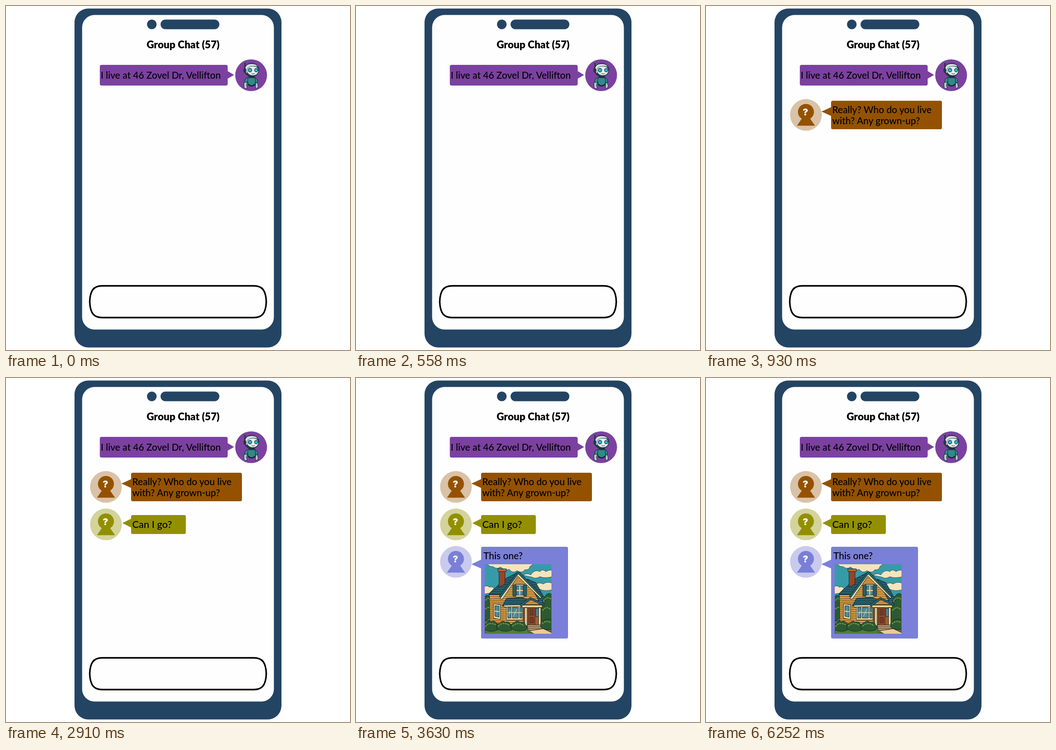
Animation of 748x748 px, one loop 8000 ms. Source, as an HTML page:

```html
<!DOCTYPE html>
<html lang="en">
<head>
<meta charset="utf-8">
<title>Group chat</title>
<style>
  html, body { margin: 0; width: 100%; height: 100%; overflow: hidden; background: #fff; }
  svg { display: block; width: 100%; height: 100%; }
  text { font: 500 20.6px Lato, sans-serif; }
  .title { font-size: 22.3px; font-weight: 900; }
  .mark { font: 900 20px Inter, sans-serif; fill: #fff; }
  .house, .robot { stroke: #10252d; stroke-width: 1; stroke-linejoin: round; }
  .roof { fill: #28606a; }
  .trim { fill: #f4d99e; }
  .glass { fill: #4b8d9c; }
  .bush { fill: #2d5932; }
  .leaves { fill: none; stroke: #6d9640; stroke-width: 2.5; stroke-linecap: round; stroke-dasharray: 2 3.5; }
</style>
</head>
<body>
<svg viewBox="0 0 748 748">
  <defs>
    <g id="stranger">
      <circle r="34.5" fill="currentColor" />
      <circle cy="-6.5" r="17.4" />
      <path d="M0 -5L19.800 23.500H-19.500Z" />
      <text class="mark" x="-1" y="1.500" text-anchor="middle">?</text>
    </g>
    <pattern id="siding" width="8" height="4" patternUnits="userSpaceOnUse">
      <path fill="#e3a445" d="M0 0H8V4H0Z" />
      <path fill="#67431e" d="M0 3H8V4H0Z" />
    </pattern>
    <pattern id="brick" width="5" height="4" patternUnits="userSpaceOnUse">
      <path fill="#ad4f2b" d="M0 0H5V4H0Z" />
      <path stroke="#69311f" stroke-width=".6" fill="none" d="M0 0H5M0 2H5M1 0V2M3.500 2V4" />
    </pattern>
    <pattern id="shingles" width="6" height="5" patternUnits="userSpaceOnUse">
      <path fill="#2c6670" d="M0 0H6V5H0Z" />
      <path stroke="#143640" stroke-width=".9" fill="none" d="M0 4.500H6M2 2V4.500M5 0V2" />
    </pattern>
    <clipPath id="picture"><path d="M280 405H425V556H280Z" /></clipPath>
  </defs>

  <rect x="149" y="5.500" width="450" height="737" rx="30" fill="#244463" />
  <rect x="165.500" y="19.500" width="417" height="684" rx="27" fill="#fefefe" />
  <circle cx="317" cy="40" r="10.500" fill="#244463" />
  <rect x="336" y="29.500" width="128" height="21" rx="10.500" fill="#244463" />
  <path d="M209 608.500H539C557 608.500 565 618 566 643C565 668 557 677.500 539 677.500H209C191 677.500 183 668 182 643C183 618 191 608.500 209 608.500Z"
    fill="none" stroke="#000" stroke-width="3.400" />
  <text class="title" x="385" y="91.500" text-anchor="middle">Group Chat (57)</text>

  <g fill="#7b41a0">
    <rect x="204" y="128" width="278" height="45" rx="4" />
    <path d="M481 141L496 150L481 158.500Z" />
    <circle cx="533" cy="150.500" r="34.600" />
  </g>
  <text x="206" y="158">I live at 46 Zovel Dr, Vellifton</text>
  <g class="robot">
    <path d="M519.500 138V123" fill="none" stroke-width="1.800" />
    <circle cx="519.500" cy="122" r="1.600" fill="#9ed8de" />
    <path d="M526 156Q518 157 519 166L524 167L528 159ZM541 156Q548 158 547 166L543 167Z" fill="#318a8b" />
    <path d="M518 166Q516 176 520 180L525 178Q521 173 525 166ZM544 166Q549 169 548 177L543 180Q542 174 543 168Z" fill="#b5c9ce" />
    <path d="M527 154H541Q544 165 541 172Q534 177 527 172Q524 163 527 154Z" fill="#318a8b" />
    <path d="M527 170Q534 177 541 170" fill="none" stroke-width="2" />
    <path d="M529 152H540V156H529Z" fill="#263b49" />
    <ellipse cx="534" cy="139" rx="16" ry="14.500" fill="#263b49" />
    <path d="M520 136Q522 125 535 126Q544 126 547 132Q534 128 525 135L524 146Q520 144 520 136Z" fill="#d3dde0" stroke="none" />
    <path d="M524 139Q526 131 537 131Q549 131 549 142Q546 152 535 151Q524 149 524 139Z" fill="#e7ecec" stroke-width=".5" />
    <ellipse cx="519.500" cy="140" rx="2.500" ry="4.500" fill="#263b49" />
    <circle cx="530.500" cy="139.500" r="3.900" fill="#22c0e4" stroke-width="1.200" />
    <circle cx="544" cy="139.500" r="3.600" fill="#22c0e4" stroke-width="1.200" />
    <path d="M534 146.500Q537.500 149.500 541 146.500" fill="none" />
  </g>

  <g data-start="930">
    <g fill="#945200">
      <rect x="272" y="206" width="241" height="62" rx="3.500" />
      <path d="M251 229.500L273 219.500V239.500Z" />
      <use href="#stranger" x="217.300" y="236.800" color="#d9c2a7" />
    </g>
    <text x="274.500" y="232.500">Really? Who do you live</text>
    <text x="274.500" y="256.500">with? Any grown-up?</text>
  </g>

  <g data-start="1830">
    <g fill="#929000">
      <rect x="272" y="298" width="119" height="41.300" rx="3.500" />
      <path d="M253 315.500L273 305.500V325.500Z" />
      <use href="#stranger" x="217.300" y="318.300" color="#d3d39b" />
    </g>
    <text x="274.500" y="326" style="font-size: 21.500px">Can I go?</text>
  </g>

  <g data-start="3630">
    <g fill="#7a7fd7">
      <rect x="272" y="367" width="189" height="199.500" rx="3.500" />
      <path d="M251 405L273 394.500V414.500Z" />
      <use href="#stranger" x="217.300" y="399.800" color="#c9caee" />
    </g>
    <text x="277" y="393.500">This one?</text>
    <g class="house" clip-path="url(#picture)">
      <path d="M280 405H425V556H280Z" fill="#369ba9" stroke="none" />
      <g fill="#f5e4bd" stroke-width=".7">
        <path d="M286 404Q290 411 298 410Q306 417 314 411Q326 420 333 416Q341 426 350 419Q361 426 367 417Q377 418 378 410L386 404Z" />
        <path d="M277 455Q285 449 290 455Q297 452 300 458L290 468L277 470Z" />
        <path d="M363 429Q372 423 380 428Q389 415 400 421Q405 414 413 421Q422 415 430 420V431Q412 437 400 432Q390 438 383 433Z" />
        <path d="M390 449Q399 443 407 448Q416 441 428 447V460Q410 465 399 459Z" />
      </g>
      <path class="bush" d="M278 476Q286 469 291 476Q300 481 296 494Q305 505 298 518L278 530Z" />
      <path class="bush" d="M403 532Q397 523 402 512Q398 498 406 492Q402 479 411 475Q417 464 428 472V535Z" />
      <path d="M280 528Q350 519 425 530V557H280Z" fill="#4f7c3b" />

      <path d="M290 470L322 466L353 429L395 474L402 535L323 537L291 530Z" fill="url(#siding)" />
      <path d="M291 480L322 475V536L291 529Z" fill="#9e652b" opacity=".22" stroke="none" />
      <path d="M372 437L391 445L413 484L397 484Z" fill="url(#shingles)" />
      <path d="M352 422L322 438L288 471L315 471Z" fill="url(#shingles)" />
      <path class="trim" d="M353 422L404 476L401 479L352 431L318 481L313 480Z" />
      <path class="roof" d="M352 421L356 422L406 475L402 476L353 426L315 477L311 475Z" />
      <path d="M311 419H324V448L311 455Z" fill="url(#brick)" />
      <path d="M308 415H327V421H309Z" fill="#bc6236" />

      <path class="trim" d="M346 449H367V476H346Z" />
      <path class="glass" d="M349 452H363V472H349Z" />
      <path class="roof" d="M341 450H348V474H341ZM364 450H371V474H364Z" />
      <path d="M356 452V472M349 462H363" fill="none" stroke="#f4d99e" stroke-width="1.800" />
      <path class="trim" d="M299 491L314 493V525L299 522Z" />
      <path class="glass" d="M302 495L311 496V520L302 518Z" />
      <path d="M302 507L311 508" fill="none" stroke="#f4d99e" stroke-width="2" />

      <path d="M364 497H402V540H364Z" fill="#9e632a" />
      <path d="M375 500H389V538H375Z" fill="#a54925" />
      <path d="M378 503H386V516H378ZM378 520H386V533H378Z" fill="#793822" stroke-width=".6" />
      <path class="glass" d="M391 501H397V519H391Z" />
      <path class="trim" d="M327 495H363V526H327Z" />
      <path class="glass" d="M330 499H337V522H330ZM340 499H353V522H340ZM356 499H361V522H356Z" />
      <path d="M331 517L336 506M342 519L350 502" fill="none" stroke="#c9e0d0" />
      <path d="M330 510H361" fill="none" stroke="#f4d99e" stroke-width="1.400" />
      <path d="M327 479L361 477L378 484L361 495L318 496Z" fill="url(#shingles)" />
      <path class="trim" d="M321 494L362 493V497L322 498Z" />
      <path d="M361 493L380 480L405 493Z" fill="url(#siding)" />
      <path class="roof" d="M356 493L379 477L410 491L408 495L380 482L359 497Z" />
      <path class="trim" d="M361 494H405V499H361ZM367 499H372V539H367ZM397 499H402V539H397Z" />

      <path d="M372 537H402L412 553H375Z" fill="#c6a36d" />
      <path d="M372 541H404M374 545H407M375 549H410" fill="none" />
      <path d="M376 550L407 545L426 554V557H388Z" fill="#edc994" />
      <g class="bush">
        <path d="M279 547Q276 537 284 535Q286 526 294 530Q303 526 306 535Q313 539 309 547Q295 555 279 547Z" />
        <path d="M306 545Q304 535 313 533Q318 526 325 531Q333 528 336 536Q344 541 338 548Q321 555 306 545Z" />
        <path d="M337 544Q335 534 344 532Q350 526 357 531Q367 529 369 538Q375 546 366 549Q348 553 337 544Z" />
        <path d="M402 542Q399 532 407 529Q414 520 428 527V546Q413 550 402 542Z" />
      </g>
      <path class="leaves" d="M282 540Q288 530 303 536M310 539Q320 529 334 538M341 539Q352 529 366 539M405 534Q413 526 424 532M408 485Q414 474 423 480M406 505Q414 495 423 503M282 483Q288 475 293 484M282 502Q289 495 296 503" />
    </g>
  </g>
</svg>
<script>
  const LOOP = 8000;
  const messages = document.querySelectorAll("[data-start]");
  const started = performance.now();

  function draw() {
    const time = (performance.now() - started) % LOOP;
    for (const message of messages) {
      message.style.display = time >= Number(message.dataset.start) ? "" : "none";
    }
    requestAnimationFrame(draw);
  }
  draw();
</script>
</body>
</html>
```
